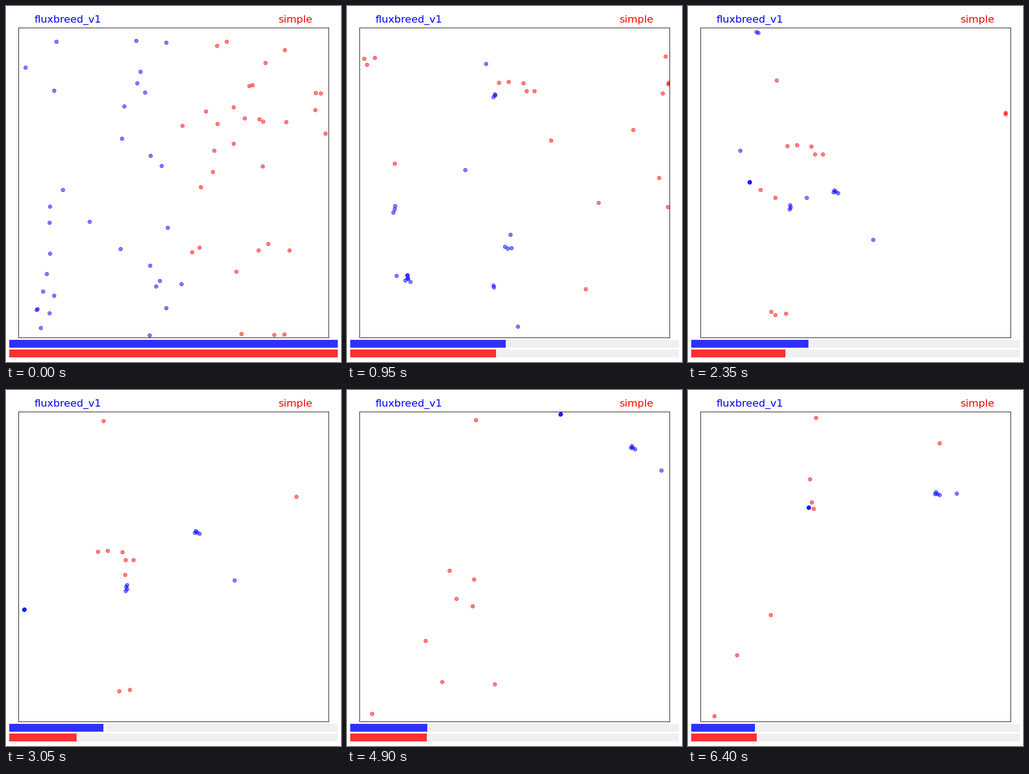
Recreate the animation shown at these times as a matplotlib script. Size 726 by 771 pixels, loop 6450 ms.

```python
import numpy as np
import matplotlib.pyplot as plt
from matplotlib.animation import FuncAnimation
from matplotlib.patches import Rectangle

W, H, DPI = 726, 771, 100
FRAMES, STEP = 129, 50
ORIGIN = np.array([27.0, 47.0])
SIZE = np.array([672.0, 671.0])
SPEED = 0.01 * SIZE  # top speed per frame on each axis
TURNS = np.array([0, 19, 34, 61, 85, 110])  # agents pick a new heading here
BAR_X, BAR_W, BAR_H = 7, 711.5, 17

rng = np.random.default_rng(7)


class Agent:
    def __init__(self, start, path, end=FRAMES, rest=0, scatter=0):
        self.start = np.array(start, float)
        self.path = np.array(path, float)
        self.end = end
        self.rest = rng.uniform(-rest, rest, 2)
        self.scatter = rng.uniform(-scatter, scatter, 2)

    def position(self, frame):
        """Constant heading per leg, the last one is kept; the world wraps."""
        begin = TURNS[:len(self.path)]
        spans = np.diff(np.append(begin, FRAMES))
        spent = np.clip(frame - begin, 0, spans)
        offset = self.rest + self.scatter * np.exp(-frame / 8)
        pos = self.start + spent @ self.path * SPEED + offset
        return ORIGIN + (pos - ORIGIN) % SIZE


class Team:
    def __init__(self, color, side, health):
        self.color, self.side, self.health = color, side, health
        self.agents = []

    def add(self, start, *path, end=FRAMES):
        self.agents.append(Agent(start, path, end))

    def flock(self, size, rest, start, *path, end=FRAMES):
        """A leader with followers that close in on it."""
        self.add(start, *path, end=end)
        for _ in range(size - 1):
            self.agents.append(Agent(start, path, end, rest, 45))

    def fill(self, total):
        """Scatter the rest over the team's half; they fall early."""
        while len(self.agents) < total:
            start = rng.uniform((self.side, 52), (self.side + 320, 713))
            self.add(start, rng.uniform(-1, 1, 2), end=rng.uniform(3, 25))

    def positions(self, frame):
        return np.array([a.position(frame) for a in self.agents if frame < a.end])


blue = Team("blue", 32, [711.5, 337, 301.5, 203.5, 180, 154.5, 138])
red = Team("red", 372, [711.5, 316, 257, 146, 163.5, 168, 142])

NE, SW = (1, -1), (-1, 1)

blue.flock(3, 1, (301, 187), (.16, .05), SW)
blue.flock(4, 5, (88, 580), (.34, .08), NE, NE, NE, (.51, -.26), SW)
blue.add((347, 654.5), (.18, .31), (-.56, -1), NE, NE, (.28, -.88), SW)
blue.flock(3, 5, (95, 434), (.06, .05), (.82, 0), (.42, -.05), end=72)
blue.add((350, 480), (.03, .12), (-1, -.87), (.05, .08), end=70)
blue.flock(3, 6, (333, 595), (.12, -.55), (-.9, -.2), end=45)
blue.flock(2, 6, (75, 697), (.45, -.84), (1, -.85), end=46)
blue.flock(2, 6, (310.5, 713), (.05, -.85), (-.9, .65), end=50)
blue.add((347, 79), (-.36, .36), SW, end=48)
blue.fill(32)

row = [(-1, .93), (-.16, .5), (.08, .47)]
pair = [NE, (.59, -.18), (-.2, .1)]

red.add((671, 188), (.2, -.17), (.45, .64), (-.62, 0), NE, (-.74, -.45), SW)
red.add((692, 276), (.65, .51), (.71, -.92), (.2, -1), (.08, -.06), (.63, .09), (-.54, 1))
red.add((567.5, 515), (1, -.63), (1, -.06), (.74, -.16), (-.6, .61), (.1, .52), SW)
red.add((478, 77.5), (-1, .68), *row, (-.13, -.38), (.47, -.97))
red.add((517, 243.5), (-1, -.47), *row, (-.4, .1), (-.22, .22))
red.add((534, 171), (-1, .1), *row, (-.17, -.39), (.09, -1))
red.add((457, 86.5), (-1, .62), *row, end=80)
red.add((509.5, 710.5), SW, *row, end=100)
red.add((581, 712.5), (1, .57), *pair, (-.07, -.41), (-.78, -.21))
red.add((604, 95), (1, .13), *pair, (.97, -.33), SW)
red.add((670, 225.5), (.2, -.44), (.45, .64), (-.6, 0), end=50)
red.add((562, 123), (1, -.11), NE, (.7, -.2), end=50)
red.add((548.5, 245), (1, 1), (1, .6), (.6, -.4), end=52)
red.fill(32)

plt.rcParams["font.family"] = "DejaVu Sans"
fig = plt.figure(figsize=(W / DPI, H / DPI), dpi=DPI, facecolor="white")

stage = fig.add_axes([0, 0, 1, 1])
stage.set(xlim=(0, W), ylim=(H, 0))
stage.axis("off")

left, top = ORIGIN
right, bottom = ORIGIN + SIZE
arena = fig.add_axes([left / W, 1 - bottom / H, SIZE[0] / W, SIZE[1] / H])
arena.set(xlim=(left, right), ylim=(bottom, top), xticks=[], yticks=[])


def show_team(team, name, x, bar_y):
    stage.text(x, 36, name, color=team.color, fontsize=16.1, va="baseline")
    stage.add_patch(Rectangle((BAR_X, bar_y), BAR_W, BAR_H, fc="#f0f0f0", lw=0))
    team.bar = stage.add_patch(
        Rectangle((BAR_X, bar_y), BAR_W, BAR_H, fc=team.color, alpha=0.8, lw=0))
    team.dots, = arena.plot([], [], "o", color=team.color, ms=5.7, mew=0.9, alpha=0.5)


show_team(blue, "fluxbreed_v1", 61.3, 723)
show_team(red, "simple", 591.2, 744)


def draw(frame):
    for team in (blue, red):
        team.dots.set_data(*team.positions(frame).T)
        team.bar.set_width(np.interp(frame, [*TURNS, FRAMES - 1], team.health))
    return blue.dots, red.dots, blue.bar, red.bar


anim = FuncAnimation(fig, draw, frames=FRAMES, interval=STEP, repeat=True,
                     repeat_delay=0)
plt.show()
```
